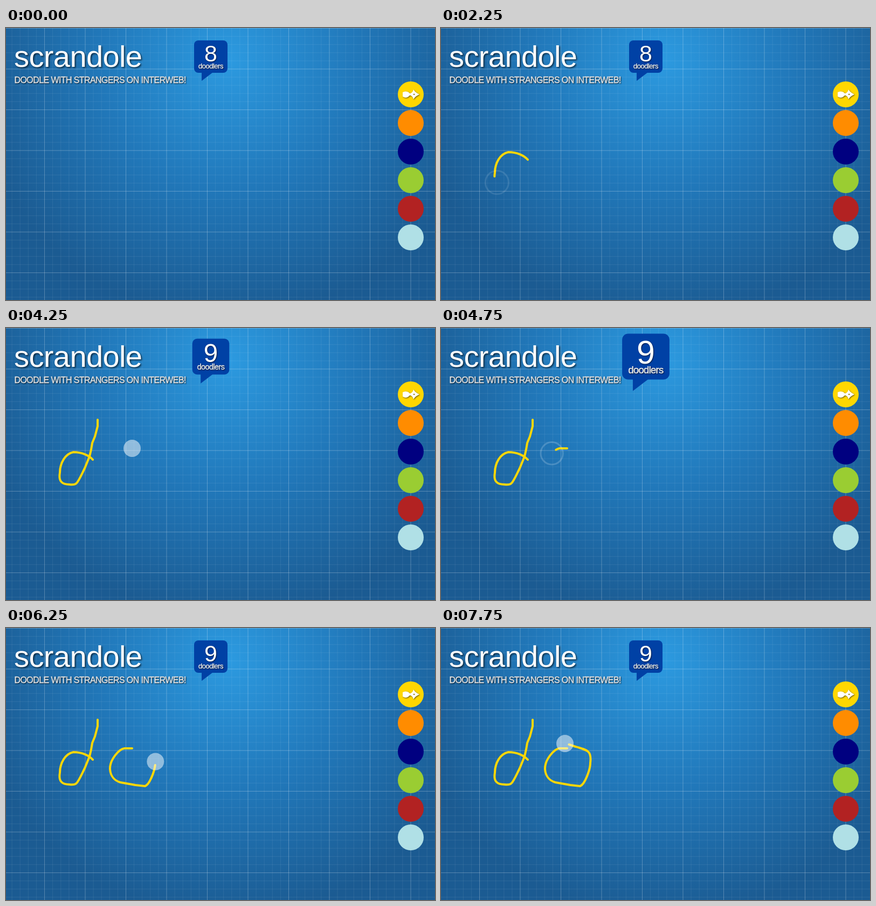
These frames come from a looping animation (796x504 px, 8000 ms). An HTML page:

```html
<!DOCTYPE html>
<html lang="en">
<head>
<meta charset="utf-8">
<title>Shared doodle board</title>
<style>
  html, body { margin: 0; width: 100%; height: 100%; overflow: hidden; background: #1b5d94; }
  svg { display: block; width: 100%; height: 100%; }
  text { font-family: "Liberation Sans", Arial, sans-serif; fill: #fff; stroke: #fff; stroke-width: 0; }
  .title { font-size: 56px; letter-spacing: -.6px; text-shadow: 2px 2px 3px rgba(0,0,0,.6); }
  .tagline { font-size: 16px; letter-spacing: -.59px; stroke-width: .35px; text-shadow: 1px 1px 2px rgba(0,0,0,.7); }
  .badge text { text-anchor: middle; text-shadow: 1px 1px 2px rgba(0,0,0,.6); }
  .badge .label { font-size: 13px; letter-spacing: -.5px; stroke-width: .35px; }
  .ink { fill: none; stroke: #ffd700; stroke-width: 4; stroke-linecap: round; stroke-linejoin: round; }
  .nib { fill: #fff; filter: drop-shadow(1px 1px 1px rgba(0,0,0,.6)); }
</style>
</head>
<body>
<svg viewBox="0 0 796 504" preserveAspectRatio="none">
  <defs>
    <radialGradient id="glow" gradientUnits="userSpaceOnUse" cx="412" cy="60" r="475">
      <stop offset="0" stop-color="#2c9ae0"/>
      <stop offset=".5" stop-color="#2178ba"/>
      <stop offset="1" stop-color="#1b5b92"/>
    </radialGradient>
  </defs>
  <rect width="796" height="504" fill="url(#glow)"/>
  <path id="minor" stroke="#fff" stroke-opacity=".08"/>
  <path id="major" stroke="#fff" stroke-opacity=".2"/>

  <text class="title" x="15" y="72">scrandole</text>
  <text class="tagline" x="15.5" y="102">DOODLE WITH STRANGERS ON INTERWEB!</text>

  <g class="badge" id="badge">
    <rect x="349" y="23" width="62" height="60" rx="8" fill="#0041a5"/>
    <path d="M363 82V98L384 82Z" fill="#0041a5"/>
    <text id="count" x="380" y="62" font-size="43">8</text>
    <text class="label" x="380" y="75">doodlers</text>
  </g>

  <g id="palette"></g>
  <path class="nib" fill-rule="evenodd" d="M736 119Q742 116 747 119L749 121H751Q755 119 756 114Q760 120 767 123Q760 126 756 132Q755 127 751 125H749L747 127Q742 131 736 127ZM756 123a1.2 1.2 0 1 0 2.4 0a1.2 1.2 0 1 0-2.4 0Z"/>

  <path class="ink" d="M161 244C155 237 142 230 125 230C110 233 100 250 100 268C97 284 104 290 118 290C132 292 132 288 146 260L155 238 158 225 160 213 165 201 170 182 170 170 172 180"/>
  <path class="ink" d="M234 223H220C210 224 192 244 193 262C194 275 202 283 212 286L240 291 258 293C267 290 277 262 277 250C280 228 272 226 250 220L238 216 230 214"/>
  <circle id="touch" stroke="#fff"/>
</svg>
<script>
const $ = id => document.getElementById(id);
const LOOP = 8000, STEP = 250, CELL = 75.5;
const TOUCH_START = 1000, INK_LAG = 80;
const JOIN = 4190, PULSE = 840;

function gridPath(gap) {
  let d = '';
  for (let x = -4; x < 796; x += gap) d += `M${x} 0V504`;
  for (let y = .5; y < 504; y += gap) d += `M0 ${y}H796`;
  return d;
}
$('minor').setAttribute('d', gridPath(CELL / 5));
$('major').setAttribute('d', gridPath(CELL));

$('palette').innerHTML = ['#ffd700', '#ff8c00', '#000080', '#9acd32', '#b22222', '#b0e0e6']
  .map((c, i) => `<circle cx="751" cy="${123 + 53 * i}" r="24" fill="${c}"/>`).join('');

// The finger runs the whole path; the last "tail" pixels leave no ink
const [first, second] = [
  { start: 1250, end: 3100, tail: 10, ease: u => u ** 1.5 },
  { start: 4500, end: 7750, tail: 8, ease: u => Math.sin(u * Math.PI / 2) }
].map((stroke, i) => {
  const path = document.querySelectorAll('.ink')[i];
  return { ...stroke, path, total: path.getTotalLength() };
});
const lift = 3450, land = 4250;
const rippleStarts = [1250, 2090, 4660];

const progress = (t, from, to) => Math.min(1, Math.max(0, (t - from) / (to - from)));
const travelled = (s, t) => s.total * s.ease(progress(t, s.start, s.end));

function setAttrs(el, attrs) {
  for (const name in attrs) el.setAttribute(name, attrs[name]);
}

function drawInk(s, t) {
  const length = Math.min(travelled(s, t - INK_LAG), s.total - s.tail);
  setAttrs(s.path, { visibility: length ? 'visible' : 'hidden', 'stroke-dasharray': `${length} 999` });
}

function fingerAt(t) {
  const a = first.path.getPointAtLength(travelled(first, t));
  const b = second.path.getPointAtLength(travelled(second, t));
  const u = progress(t, lift, land), k = u * u * (3 - 2 * u);
  return { cx: a.x + (b.x - a.x) * k, cy: a.y + (b.y - a.y) * k };
}

function drawTouch(t) {
  const began = rippleStarts.find(r => t >= r && t < r + STEP);
  const age = t - began;
  const look = began
    ? { r: 19.5 + age * .013, opacity: .27 - age * .001, fill: 'none', 'stroke-width': 3 }
    : { r: 16, opacity: .5, fill: '#fff', 'stroke-width': 0 };
  setAttrs($('touch'), { ...fingerAt(t), ...look, visibility: t < TOUCH_START ? 'hidden' : 'visible' });
}

function drawBadge(t) {
  const scale = 1 + .48 * Math.sin(Math.PI * progress(t, JOIN, JOIN + PULSE));
  $('count').textContent = t < JOIN ? 8 : 9;
  $('badge').setAttribute('transform', `translate(380 53) scale(${scale}) translate(-380 -53)`);
}

function draw(now) {
  const t = Math.floor(now % LOOP / STEP) * STEP;
  drawInk(first, t);
  drawInk(second, t);
  drawTouch(t);
  drawBadge(t);
}

let begin;
function tick(now) {
  begin ??= now;
  draw(now - begin);
  requestAnimationFrame(tick);
}
draw(0);
requestAnimationFrame(tick);
</script>
</body>
</html>
```
